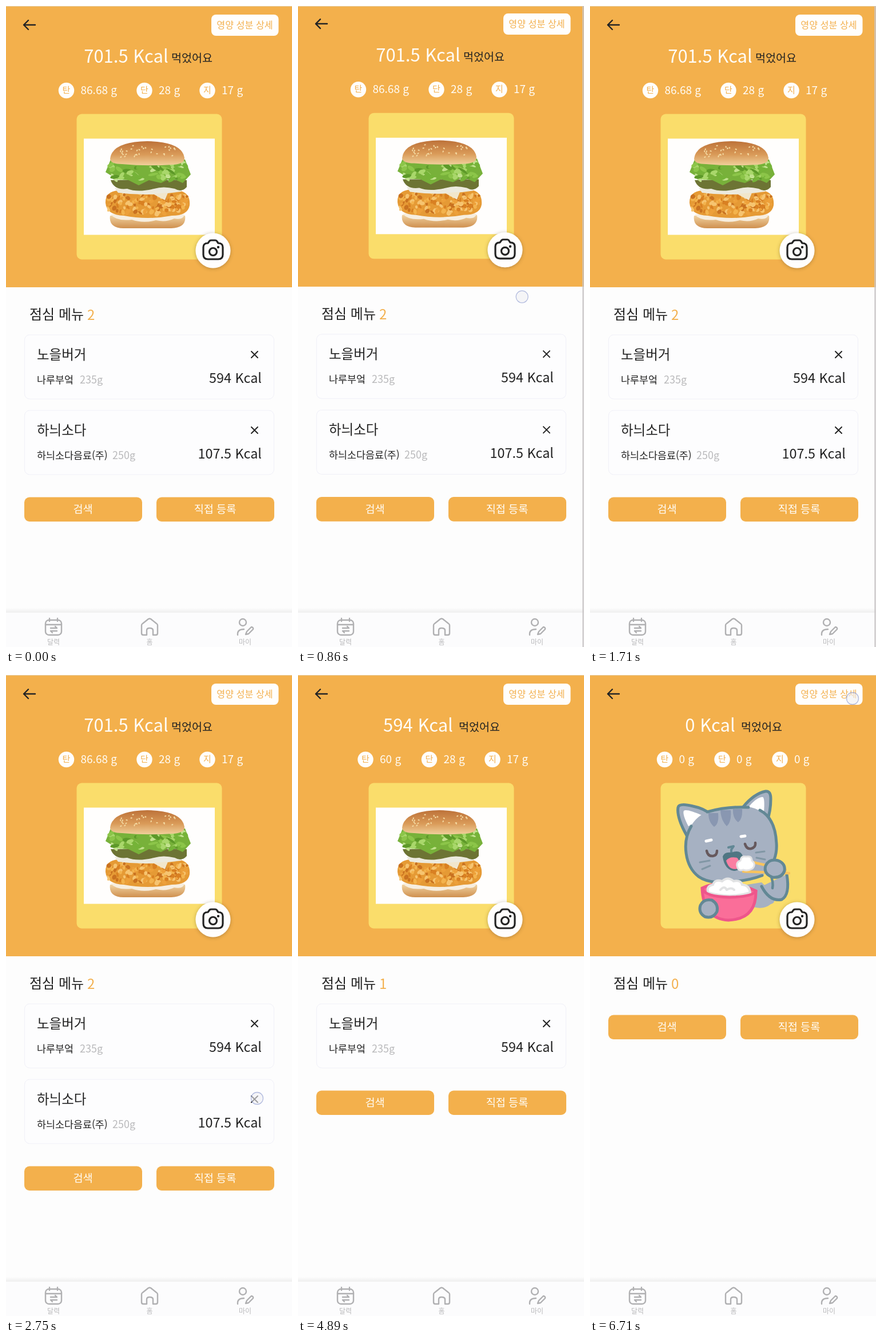
These frames come from a looping animation (500 px wide and 1119 px high, 6740 ms). An HTML page:

```html
<!DOCTYPE html>
<html lang="ko">
<head>
<meta charset="utf-8">
<title>점심 메뉴</title>
<style>
  html, body { margin: 0; width: 100%; height: 100%; overflow: hidden; background: #fdfdfd; }
  svg { display: block; width: 100%; height: 100%; }
  text { font-family: "Noto Sans CJK KR", "Noto Sans CJK", "Noto Sans KR", sans-serif; fill: #222; }
  text.white { fill: #fffdf8; }
  text.orange { fill: #f3b04e; }
  text.gray { fill: #b9b9bb; }
  text.mid { text-anchor: middle; }
  text.end { text-anchor: end; }
  .line { fill: none; stroke-linecap: round; stroke-linejoin: round; }
  .ink { stroke: #242424; }
  .nav { stroke: #b0b0b2; stroke-width: 2.4; }
  .fur { fill: #a6b1c2; stroke: #628895; stroke-width: 5; stroke-linejoin: round; }
</style>
</head>
<body>
<svg viewBox="0 0 500 1119" preserveAspectRatio="none">
  <defs>
    <linearGradient id="bun" x1="0" y1="0" x2="0" y2="1">
      <stop offset="0" stop-color="#bd7239"/><stop offset=".55" stop-color="#d99a58"/><stop offset="1" stop-color="#f0cf9b"/>
    </linearGradient>
    <linearGradient id="base" x1="0" y1="0" x2="0" y2="1">
      <stop offset="0" stop-color="#f0d2a0"/><stop offset="1" stop-color="#cf904f"/>
    </linearGradient>
    <linearGradient id="navShade" x1="0" y1="0" x2="0" y2="1">
      <stop offset="0" stop-color="#000" stop-opacity="0"/><stop offset="1" stop-color="#000" stop-opacity=".06"/>
    </linearGradient>
    <filter id="shadow" x="-30%" y="-30%" width="160%" height="160%">
      <feDropShadow dx="0" dy="1" stdDeviation="3" flood-color="#5a4520" flood-opacity=".4"/>
    </filter>
  </defs>

  <rect width="500" height="1119" fill="#fdfdfd"/>
  <g id="page">
    <rect y="-4" width="500" height="495" fill="#f3b04c"/>
    <path class="line ink" stroke-width="2.4" d="M51 33H31M39 25L31 33L39 41"/>
    <rect x="359" y="15" width="117.500" height="37" rx="8" fill="#fffefc"/>
    <text class="orange mid" x="417.500" y="39" font-size="16.200">영양 성분 상세</text>
    <rect x="123.500" y="188.500" width="254" height="254" rx="9" fill="#fadd6b"/>

    <g id="burger">
      <rect x="136" y="231.500" width="229" height="168" fill="#fffefd"/>
      <path d="M182 366H313Q316 387 289 388H205Q179 387 182 366Z" fill="url(#base)"/>
      <path d="M183 364Q245 354 312 364Q310 374 294 371Q280 378 262 374Q240 380 220 373Q193 376 183 364Z" fill="#f7eedf"/>
      <g id="chicken"></g>
      <path d="M190 318Q248 311 311 317L306 324Q248 333 196 326Z" fill="#eceade"/>
      <path d="M257 328L283 326L278 339L268 334Z" fill="#f1e6cc"/>
      <path d="M183 304H316V316Q307 326 295 319Q275 314 259 319Q230 326 212 319Q189 322 183 304Z" fill="#6d7434"/>
      <g id="lettuce"></g>
      <path d="M182 267Q185 237 247 236Q308 237 312 265Q313 276 291 277Q246 280 203 276Q183 276 182 267Z" fill="url(#bun)"/>
      <g id="sesame" fill="#f3d8a0"></g>
    </g>

    <g id="cat" stroke-linecap="round">
      <path d="M300 362Q335 395 316 400Q304 410 286 405L250 370Z" fill="#a6b1c2"/>
      <path class="fur" d="M344 348Q350 384 335 392Q314 396 300 369"/>
      <path class="line" stroke="#628895" stroke-width="4.500" d="M316 350Q321 362 319 372"/>
      <path class="fur" d="M169 280Q151 248 154 231Q156 223 180 229Q200 233 212 244Z"/>
      <path d="M172 264Q161 243 164 237Q169 233 198 246Q194 254 188 252Q190 259 181 259Z" fill="#fff"/>
      <path class="fur" d="M268 230Q287 207 307 203Q316 202 316 216Q316 240 308 259Z"/>
      <path d="M276 232Q291 213 302 213Q306 215 304 240Q299 247 296 239Q290 244 288 236Z" fill="#fff"/>
      <path d="M177 263Q190 240 222 234L276 230Q311 235 324 274Q337 332 299 351Q266 365 228 362Q186 360 172 326Q161 292 177 263Z" fill="#a6b1c2"/>
      <path class="line" stroke="#628895" stroke-width="5" d="M177 264C160 292 166 334 190 352Q201 360 222 362Q270 362 301 350M205 239Q240 229 277 231M297 236Q324 250 326 294Q327 309 322 322"/>
      <path d="M207 241H224Q226 260 217 265Q207 257 207 241ZM228 236H246Q248 256 239 264Q229 254 228 236ZM250 234H266Q267 251 259 257Q249 250 250 234Z" fill="#8997b1"/>
      <path class="line" stroke="#66595d" stroke-width="4.500" d="M204 307Q206 317 215 316Q222 315 222 307M271 295Q274 305 282 303Q290 301 289 293"/>
      <path class="line" stroke="#fff" stroke-width="5" d="M203 290L212 288M264 282L271 281"/>
      <path class="line" stroke="#8197a5" stroke-width="3" d="M192 327L209 324M196 339L210 333M290 310L305 308M291 319L306 322"/>
      <path class="line" stroke="#628895" stroke-width="4" d="M242 301L251 299L247 305V310"/>
      <path d="M232 317Q235 308 247 310Q263 304 267 316Q269 341 252 342Q235 340 232 317Z" fill="#4f7683"/>
      <path d="M238 324Q244 316 257 319Q264 325 258 338Q243 342 238 324Z" fill="#fa7fa2"/>
      <path class="line" stroke="#f8c35d" stroke-width="4.500" d="M268 343L348 346M281 326L342 340"/>
      <path d="M258 336Q254 327 263 324Q264 315 273 317Q283 315 283 324Q291 330 284 338Q275 343 268 340Q260 343 258 336Z" fill="#fff" stroke="#e3e3e5" stroke-width="3"/>
      <path class="fur" d="M307 333Q313 320 329 324Q342 329 340 342Q335 355 319 353Q303 347 307 333Z"/>
      <path d="M196 372Q240 352 290 377Q291 426 242 428Q198 426 196 372Z" fill="#fa6e99" stroke="#ee568b" stroke-width="5"/>
      <path d="M207 380Q202 369 215 366Q218 356 231 360Q241 351 251 360Q263 357 266 366Q279 367 280 380Q244 391 207 380Z" fill="#fff" stroke="#e2e3e4" stroke-width="4"/>
      <path class="line" stroke="#e2e3e4" stroke-width="4" d="M228 375Q235 367 239 375Q247 370 252 375"/>
      <path class="line" stroke="#ee568b" stroke-width="5" d="M197 373Q200 387 244 388Q285 387 290 377"/>
      <path class="fur" d="M193 402Q199 390 213 393Q225 400 222 413Q215 426 201 422Q189 415 193 402Z"/>
    </g>

    <circle cx="362" cy="427" r="30.500" fill="#fffefd" filter="url(#shadow)"/>
    <path class="line ink" stroke-width="3.200" d="M353 414L356 410Q357 409 359 409H366Q368 409 369 411L371 414Q379 414 379 421V434Q379 442 371 442H353Q345 442 345 434V421Q345 414 353 414Z"/>
    <circle class="line ink" stroke-width="3.200" cx="362" cy="429" r="6.500"/>
    <circle cx="371" cy="421" r="2.200" fill="#242424"/>
    <g id="content"></g>
  </g>

  <rect y="1051" width="500" height="8" fill="url(#navShade)"/>
  <rect y="1059" width="500" height="60" fill="#fcfcfd"/>
  <g class="line nav">
    <rect x="69" y="1072" width="28" height="26" rx="6"/>
    <path d="M69 1080H97M76 1069V1074M90 1069V1074M78 1086H89L86 1083M89 1091H78L81 1094"/>
    <path d="M246 1098H240Q237 1098 237 1095V1081Q237 1079 239 1078L249 1070Q251 1069 253 1070L263 1078Q265 1079 265 1081V1095Q265 1098 262 1098H257V1090Q257 1086 251 1086Q246 1086 246 1090Z"/>
    <circle cx="414" cy="1076" r="6"/>
    <path d="M405 1098Q404 1088 416 1088M419 1097L421 1092L429 1084Q433 1085 432 1088L424 1096Z"/>
  </g>
  <g font-size="12">
    <text class="gray mid" x="83" y="1115">달력</text>
    <text class="gray mid" x="251" y="1115">홈</text>
    <text class="gray mid" x="418" y="1115">마이</text>
  </g>
  <rect width="500" height="1" fill="#e6d3ad"/>
  <rect id="scrollbar" x="497" width="3" height="1119" fill="#c9c5c6" opacity=".75"/>
  <circle id="touch" r="10.500" fill="#f0f0f4" fill-opacity=".6" stroke="#8c99cf" stroke-opacity=".65" stroke-width="1.300"/>
</svg>

<script>
const LOOP = 6740;
const $ = id => document.getElementById(id);

const foods = [
  { name: "노을버거", maker: "나루부엌", grams: "235g", gramsX: 129, kcal: "594" },
  { name: "하늬소다", maker: "하늬소다음료(주)", grams: "250g", gramsX: 186, kcal: "107.5" }
];
// Screens indexed by the number of foods left.
const screens = [
  { kcal: "0", kcalX: 210, eatenX: 264, nutrients: ["0", "0", "0"], badges: [130.5, 231, 332] },
  { kcal: "594", kcalX: 210, eatenX: 281, nutrients: ["60", "28", "17"], badges: [118, 229.5, 340] },
  { kcal: "701.5", kcalX: 210, eatenX: 289, nutrients: ["86.68", "28", "17"], badges: [105.5, 242, 352] }
];
const taps = [
  { from: 560, to: 1000, x: 391, y: 550, endX: 392, endY: 488 },
  { from: 2750, to: 2900, x: 439, y: 739 },
  { from: 4930, to: 5080, x: 434, y: 608 },
  { from: 6610, to: LOOP, x: 459, y: 41 }
];

const text = (x, y, size, cls, str) => `<text x="${x}" y="${y}" font-size="${size}" class="${cls}">${str}</text>`;

function card(food, i) {
  const y = 574 + i * 132;
  return `<rect x="32.5" y="${y}" width="436" height="112" rx="9" fill="#fdfdfe" stroke="#f0f0f8"/>
    <path class="line ink" stroke-width="2" d="M429 ${y + 29}l11 11m0-11l-11 11"/>` +
    text(54, y + 43, 23.5, "", food.name) +
    text(54, y + 85, 17.4, "", food.maker) +
    text(food.gramsX, y + 85, 18, "gray", food.grams) +
    text(447, y + 84, 23.4, "end", food.kcal + " Kcal");
}

function button(x, y, label) {
  return `<rect x="${x}" y="${y}" width="206" height="42.500" rx="9" fill="#f3b04c"/>` +
    text(x + 102.5, y + 27.5, 18.6, "white mid", label);
}

function content(count) {
  const s = screens[count];
  const nutrients = s.badges.map((x, i) =>
    `<circle cx="${x}" cy="147.500" r="13.700" fill="#fffefc"/>` +
    text(x, 151.5, 15, "orange mid", "탄단지"[i]) +
    text(x + 25, 154, 19, "white", s.nutrients[i] + " g"));
  const buttonY = 593.5 + count * 132;
  return text(s.kcalX, 99, 31, "white mid", s.kcal + " Kcal") +
    text(s.eatenX, 98, 19.6, "", "먹었어요") + nutrients.join("") +
    text(41, 547, 24, "", "점심 메뉴") + text(142, 548, 24, "orange", count) +
    foods.slice(0, count).map(card).join("") +
    button(32, buttonY, "검색") + button(263, buttonY, "직접 등록");
}

function paintBurger() {
  let seed = 7;
  const rand = (a, b) => a + (b - a) * ((seed = seed * 16807 % 2147483647) / 2147483647);
  const pick = list => list[Math.floor(rand(0, list.length))];
  const blobs = (n, make) => Array.from({ length: n }, (_, i) => make(i)).join("");
  const ellipse = (x, y, rx, ry, fill, turn = 0) =>
    `<ellipse rx="${rx}" ry="${ry}" fill="${fill}" transform="translate(${x} ${y}) rotate(${turn})"/>`;

  $("chicken").innerHTML =
    `<path d="M174 344Q173 324 196 322H302Q323 326 321 348Q318 366 290 366Q248 374 206 366Q176 365 174 344Z" fill="#e59a35"/>` +
    blobs(150, () => {
      const x = rand(179, 317), reach = 21 - Math.abs(x - 248) / 9;
      return ellipse(x, 345 + rand(-reach, reach), rand(2, 5), rand(1.5, 4),
        pick(["#f3b34d", "#d98022", "#eda03a", "#f6c470", "#c97220"]), rand(0, 180));
    });
  $("lettuce").innerHTML =
    `<path d="M183 268Q248 261 313 268L323 294L309 309L289 300L271 309L250 304L232 313L214 304L195 303L174 290Z" fill="#78b13a"/>` +
    blobs(65, () => ellipse(rand(181, 316), rand(273, 303), rand(4, 10), rand(2, 4),
      pick(["#8cc549", "#5d9929", "#a9d76b", "#75b338", "#c1e18d"]), rand(-55, 55)));
  $("sesame").innerHTML = blobs(32, () => {
    const x = rand(200, 296);
    return ellipse(x, rand(240 + Math.abs(x - 248) / 7, 264), 1.7, 1.1, "#f3d8a0", rand(0, 180));
  });
}

let shown = -1;
function showScreen(count) {
  if (count === shown) return;
  shown = count;
  $("content").innerHTML = content(count);
  $("burger").style.display = count ? "" : "none";
  $("cat").style.display = count ? "none" : "";
}

const clamp = v => Math.max(0, Math.min(1, v));
const smooth = v => v * v * (3 - 2 * v);

function frame(now) {
  const t = now % LOOP;
  showScreen(t < 3080 ? 2 : t < 5240 ? 1 : 0);

  // Overscroll pulls the top up by two pixels, then lets go.
  const pull = smooth(clamp((t - 600) / 220)) * (1 - smooth(clamp((t - 1000) / 300)));
  $("page").setAttribute("transform", `translate(0 1060) scale(1 ${1 + pull * 2 / 1060}) translate(0 -1060)`);
  $("scrollbar").style.display = t >= 560 && t < 2110 ? "" : "none";

  const tap = taps.find(p => t >= p.from && t < p.to);
  $("touch").style.display = tap ? "" : "none";
  if (tap) {
    const { from, to, x, y, endX = x, endY = y } = tap;
    const k = (t - from) / (to - from);
    $("touch").setAttribute("cx", x + (endX - x) * k);
    $("touch").setAttribute("cy", y + (endY - y) * k);
  }
  requestAnimationFrame(frame);
}

paintBurger();
showScreen(2);
requestAnimationFrame(frame);
</script>
</body>
</html>
```
